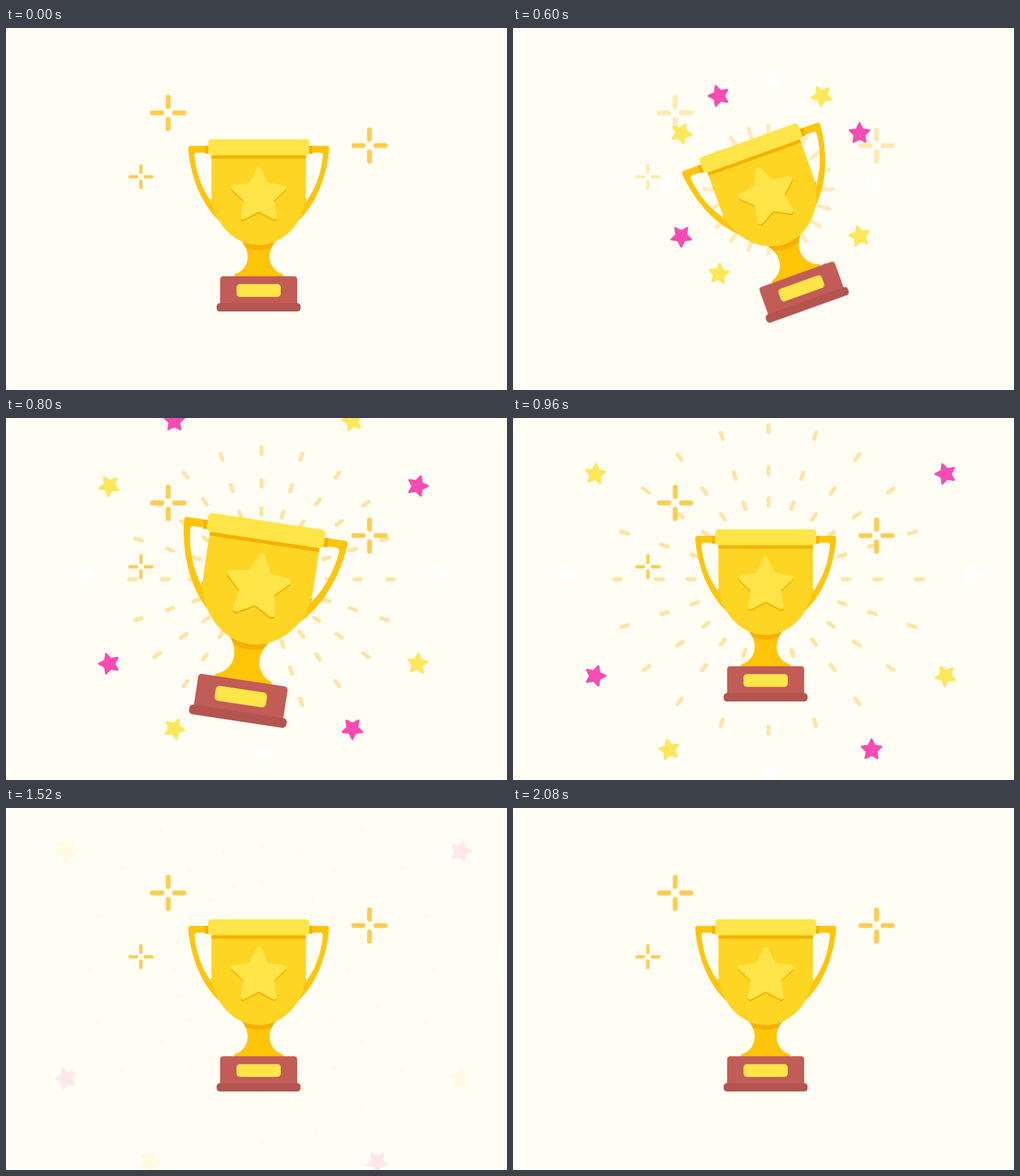
These frames come from a looping animation (764x553 px, 2600 ms). An HTML page:

```html
<!DOCTYPE html>
<html lang="en">
<head>
<meta charset="utf-8">
<title>Trophy</title>
<style>
  html, body { margin: 0; width: 100%; height: 100%; overflow: hidden; background: #fffdf4; }
  svg { display: block; width: 764px; height: 553px; }
  .gold { fill: #ffc508; }
  .shade { fill: #f6b000; }
  .light { fill: #ffe548; }
</style>
</head>
<body>
<svg viewBox="0 0 764 553">
  <defs>
    <path id="bowl" d="M313.3 190V250C313.3 298 349 331.7 385.3 331.7S457.5 298 457.5 250V190Z"/>
    <path id="stem" d="M355 320C366 332 368.6 342 368.6 350C368.6 362 360 373 350 375.6Q347.5 376.3 347.5 381H423Q423 376.3 420.6 375.6C410.600 373 402 362 402 350C402 342 404.600 332 415.600 320Z"/>
    <path id="handle" fill-rule="evenodd" d="M312 180H282Q277.500 180 277.900 185C281.500 228 299 273 329.500 298.500L340 290V180ZM312 190.600H291.500Q287 190.600 287.400 195.500C290 224 300 248 314 266.500L330 270V190.600Z"/>
    <clipPath id="inStem"><use href="#stem"/></clipPath>
    <clipPath id="inHandle"><use href="#handle"/></clipPath>
    <filter id="soft" x="-20%" y="-20%" width="140%" height="140%"><feGaussianBlur stdDeviation="3"/></filter>
    <mask id="glow" style="mask-type:alpha" maskUnits="userSpaceOnUse" x="240" y="130" width="300" height="340">
      <use href="#cup" filter="url(#soft)"/>
      <use href="#cup"/>
    </mask>
    <g id="side">
      <use href="#handle" class="gold"/>
      <g clip-path="url(#inHandle)" class="shade">
        <path d="M303.500 179H313V192H303.500Z"/>
        <path d="M312 261L329 299H345V261Z"/>
      </g>
    </g>
  </defs>
  <g id="rays" stroke="#ffe4a2" stroke-width="6" stroke-linecap="round"></g>
  <g id="sparkles" stroke="#ffcd4f" stroke-width="7.400" stroke-linecap="round"></g>
  <g id="confetti" stroke-width="8" stroke-linejoin="round"></g>
  <g id="trophy">
    <g id="cup">
      <use href="#side"/>
      <use href="#side" transform="translate(770.600 0) scale(-1 1)"/>
      <use href="#stem" class="gold"/>
      <g clip-path="url(#inStem)"><use href="#bowl" y="7" class="shade"/></g>
      <use href="#bowl" fill="#ffd524"/>
      <rect class="shade" x="313.300" y="192" width="144.200" height="7.500"/>
      <rect class="light" x="308.300" y="170" width="154" height="24.600" rx="5"/>
      <g id="badge" stroke-width="8" stroke-linejoin="round"></g>
      <rect x="326.500" y="379.200" width="117.500" height="48" rx="4.500" fill="#c25c56"/>
      <rect x="321.200" y="420.300" width="128" height="12.800" rx="5" fill="#b4544f"/>
      <rect class="light" x="351.500" y="391.200" width="67.500" height="19.600" rx="5"/>
    </g>
  </g>
  <g mask="url(#glow)">
    <path id="shine" d="M135 -165L635 165V12L135 -318Z" fill="#ffecac" opacity=".4" filter="url(#soft)"/>
  </g>
</svg>
<script>
const LOOP = 2600, STEP = 40;
const $ = id => document.getElementById(id);

function add(parent, tag, attrs) {
  const el = document.createElementNS('http://www.w3.org/2000/svg', tag);
  for (const k in attrs) el.setAttribute(k, attrs[k]);
  return parent.appendChild(el);
}

// Smooth curve through [time, value] pairs without overshoot, held at both ends.
function track(...keys) {
  const rise = i => (keys[i + 1][1] - keys[i][1]) / (keys[i + 1][0] - keys[i][0]);
  const last = keys.length - 1;
  const slope = keys.map((_, i) => {
    if (i === 0) return rise(0);
    if (i === last) return rise(last - 1);
    const a = rise(i - 1), b = rise(i);
    return a * b <= 0 ? 0 : 2 * a * b / (a + b);
  });
  return t => {
    if (t <= keys[0][0]) return keys[0][1];
    if (t >= keys[last][0]) return keys[last][1];
    let i = 0;
    while (t > keys[i + 1][0]) i++;
    const [t0, v0] = keys[i], [t1, v1] = keys[i + 1];
    const d = t1 - t0, p = (t - t0) / d, q = 1 - p;
    return v0 * q * q * (1 + 2 * p) + v1 * p * p * (1 + 2 * q)
      + d * p * q * (slope[i] * q - slope[i + 1] * p);
  };
}

const starPoints = Array.from({ length: 10 }, (_, i) => {
  const r = i % 2 ? 19.8 : 40, a = (i * 36 - 90) * Math.PI / 180;
  return (r * Math.cos(a)).toFixed(2) + ',' + (r * Math.sin(a)).toFixed(2);
}).join(' ');
const star = (parent, color, transform = '') =>
  add(parent, 'polygon', { points: starPoints, fill: color, stroke: color, transform });

star($('badge'), '#f6b000', 'translate(385.4 258.6)');
star($('badge'), '#ffe548', 'translate(385.4 256.2)');

for (const [x, y, s] of [[247.3, 129.8, 1], [554.3, 179.6, 1], [205.7, 227.2, 0.69]]) {
  add($('sparkles'), 'path', {
    d: 'M0-24V-9.700M0 24V9.700M-24 0H-9.700M24 0H9.700',
    transform: `translate(${x} ${y}) scale(${s})`
  });
}

const confetti = Array.from({ length: 12 }, (_, i) =>
  star($('confetti'), ['#ffffff', '#ffe75a', '#fa4bb4'][i % 3]));

const rays = [];
for (let ring = 0; ring < 3; ring++) {
  for (let i = 0; i < 20; i++) {
    rays.push({ ring, el: add($('rays'), 'line', { transform: `translate(389.5 246.500) rotate(${i * 18})` }) });
  }
}

const tilt = track([320, 0], [400, -4], [580, -20], [600, -19.8], [760, 10.5], [800, 8.6], [920, 0]);
const size = track([320, 1], [440, 0.95], [600, 1.04], [760, 1.185], [800, 1.173], [920, 1]);
const sparkle = track([320, 1], [500, 0], [600, 0.4], [760, 1]);

const spread = track([480, 0], [600, 157], [800, 271.5], [960, 308.5], [1280, 339.5], [1440, 346], [1560, 348]);
const spin = track([480, -120], [600, 0], [800, 90], [960, 126], [1280, 154], [1560, 162]);
const pop = track([480, 0.1], [580, 0.39]);
const fade = track([1200, 1], [1280, 0.85], [1560, 0]);

const rings = [
  track([480, 0], [600, 94], [800, 197], [960, 230.5], [1280, 256], [1560, 264]),
  t => spread(t) * 0.54,
  t => spread(t) * 0.383
];
const dash = track([480, 0], [600, 7], [800, 10], [960, 10.5], [1280, 6.5], [1560, 0]);
const rayIn = track([500, 0.2], [600, 0.7], [720, 1]);

function draw(t) {
  $('trophy').setAttribute('transform',
    `translate(385.3 246.500) rotate(${tilt(t)}) scale(${size(t)}) translate(-385.3 -246.500)`);
  $('sparkles').setAttribute('opacity', sparkle(t));

  const live = t >= 480 && t < 1560 ? 'visible' : 'hidden';
  $('confetti').setAttribute('visibility', live);
  $('rays').setAttribute('visibility', live);
  $('confetti').setAttribute('opacity', fade(t));
  $('rays').setAttribute('opacity', rayIn(t) * fade(t));

  const r = spread(t);
  confetti.forEach((el, i) => {
    const deg = i * 30, a = deg * Math.PI / 180;
    el.setAttribute('transform', `translate(${392.5 + r * Math.cos(a)} ${239.7 + r * Math.sin(a)}) `
      + `rotate(${deg + 30 + spin(t)}) scale(${pop(t)})`);
  });

  const half = dash(t) / 2;
  const reach = rings.map(f => f(t));
  for (const { ring, el } of rays) {
    el.setAttribute('x1', reach[ring] - half);
    el.setAttribute('x2', reach[ring] + half);
  }

  const shining = t >= 1520 && t < 2080;
  $('shine').setAttribute('visibility', shining ? 'visible' : 'hidden');
  $('shine').setAttribute('transform', `translate(0 ${417 - 1.1 * (t - 1760)})`);
}

const start = performance.now();
function tick() {
  const t = (performance.now() - start) % LOOP;
  draw(Math.floor(t / STEP) * STEP);
  requestAnimationFrame(tick);
}
tick();
</script>
</body>
</html>
```
